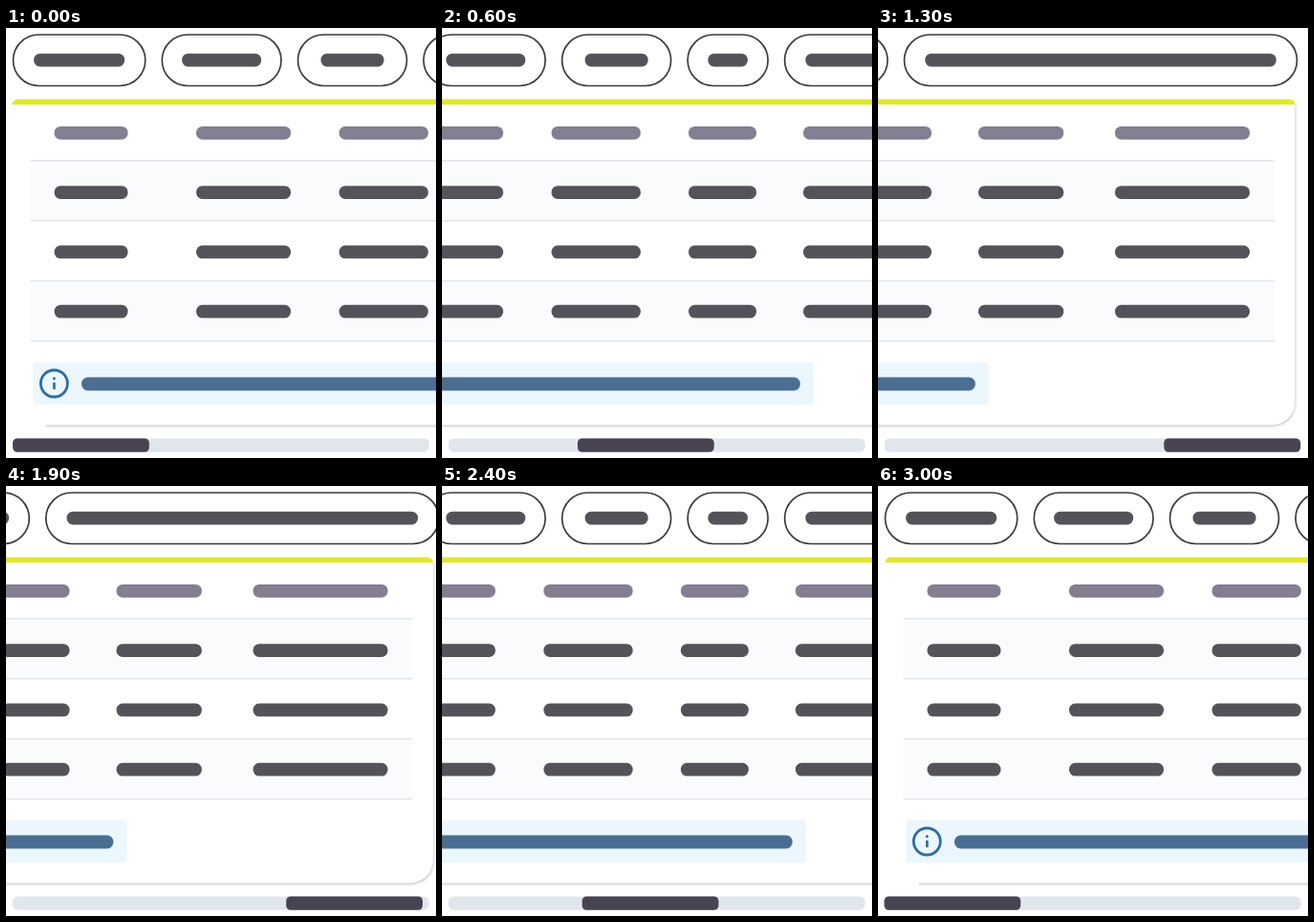
Write an HTML page with a canvas that moves like this. It is 450 by 450 pixels and loops after 3600 ms.

```html
<!DOCTYPE html>
<html lang="en">
<head>
<meta charset="utf-8">
<title>Scrolling table</title>
<style>
  html, body { margin: 0; width: 100%; height: 100%; overflow: hidden; background: #fff; }
  canvas { display: block; width: 450px; height: 450px; }
</style>
</head>
<body>
<canvas id="stage" width="450" height="450"></canvas>
<script>
const ctx = document.getElementById('stage').getContext('2d');
const LOOP = 3600, STEP = 100;
const DARK = '#54535a';

// Pill width and label width; column start and label width
const pills = [[138.3, 95], [124.7, 83], [114, 66], [84, 41.5], [411, 367.5]];
const columns = [[50.5, 77], [199, 99], [348.5, 93.3], [492, 71], [612, 89.3], [755, 141]];

function box(x, y, w, h, r, fill) {
  ctx.beginPath();
  ctx.roundRect(x, y, w, h, r);
  ctx.fillStyle = fill;
  ctx.fill();
}

const bar = (x, y, w, fill) => box(x, y, w, 13.8, 6.5, fill);

function ease(t, start, end) {
  const u = Math.min(1, Math.max(0, (t - start) / (end - start)));
  return u * u * (3 - 2 * u);
}

function shifted(dx, draw) {
  ctx.save();
  ctx.translate(dx, 0);
  draw();
  ctx.restore();
}

function drawPills() {
  ctx.strokeStyle = '#3b3a3f';
  ctx.lineWidth = 1.7;
  let x = 7.5;
  for (const [width, label] of pills) {
    ctx.beginPath();
    ctx.roundRect(x, 7, width, 53.5, 26.75);
    ctx.stroke();
    bar(x + (width - label) / 2, 26.7, label, DARK);
    x += width + 17.5;
  }
}

function drawCard() {
  ctx.save();
  ctx.beginPath();
  ctx.rect(42, 78, 920, 350);
  ctx.clip();
  ctx.shadowColor = 'rgba(70, 70, 100, .34)';
  ctx.shadowOffsetX = 0.5;
  ctx.shadowOffsetY = 1.2;
  ctx.shadowBlur = 3;
  box(6.5, 75, 936.8, 340.5, [6, 6, 24, 24], '#fff');
  ctx.restore();
  box(6.5, 74.6, 936.8, 5.7, [6, 6, 0, 0], '#dfe82c');
}

function drawInfo() {
  const blue = '#2e6da0';
  box(28.5, 350, 594.2, 44, 3, '#ebf6ff');
  bar(79, 365.6, 529.8, '#4a6e92');
  ctx.beginPath();
  ctx.arc(50.3, 372, 14, 0, 7);
  ctx.strokeStyle = blue;
  ctx.lineWidth = 2.8;
  ctx.stroke();
  box(48.8, 365.3, 3, 3, 1.5, blue);
  box(49, 370.7, 2.7, 7.6, 1, blue);
}

function drawTable() {
  drawCard();
  for (let i = 0; i < 4; i++) {
    const top = 138.1 + 62.9 * i;
    if (i % 2 === 0) box(25.5, top, 896.3, 63, 0, '#fafbfd');
    for (const [x, w] of columns) bar(x, 102.9 + 62.3 * i, w, i ? DARK : '#837f91');
  }
  for (let i = 0; i < 4; i++) box(25.5, 138.1 + 62.9 * i, 896.3, 1.4, 0, '#e1e3ea');
  drawInfo();
}

function draw(t) {
  // The table starts just before the loop point, so the lead-in wraps round.
  const lead = t >= LOOP - 33 ? t - LOOP : t;
  const pos = ease(lead, -33.3, 1300) - ease(lead, 1800, 2966.7);
  const pillPos = ease(t, 133.3, 1300) - ease(t, 1800, 2800);

  ctx.fillStyle = '#fff';
  ctx.fillRect(0, 0, 450, 450);
  shifted(-511 * pillPos, drawPills);
  shifted(1 - 508 * pos, drawTable);
  box(6.8, 429.5, 436, 14.2, 5.5, '#e1e6ed');
  box(6.5 + 292.8 * pos, 429.4, 142.8, 14.4, 4.8, '#474351');
}

const origin = performance.now();
function tick() {
  const t = (performance.now() - origin) % LOOP;
  draw(Math.floor(t / STEP) * STEP);
  requestAnimationFrame(tick);
}
tick();
</script>
</body>
</html>
```
